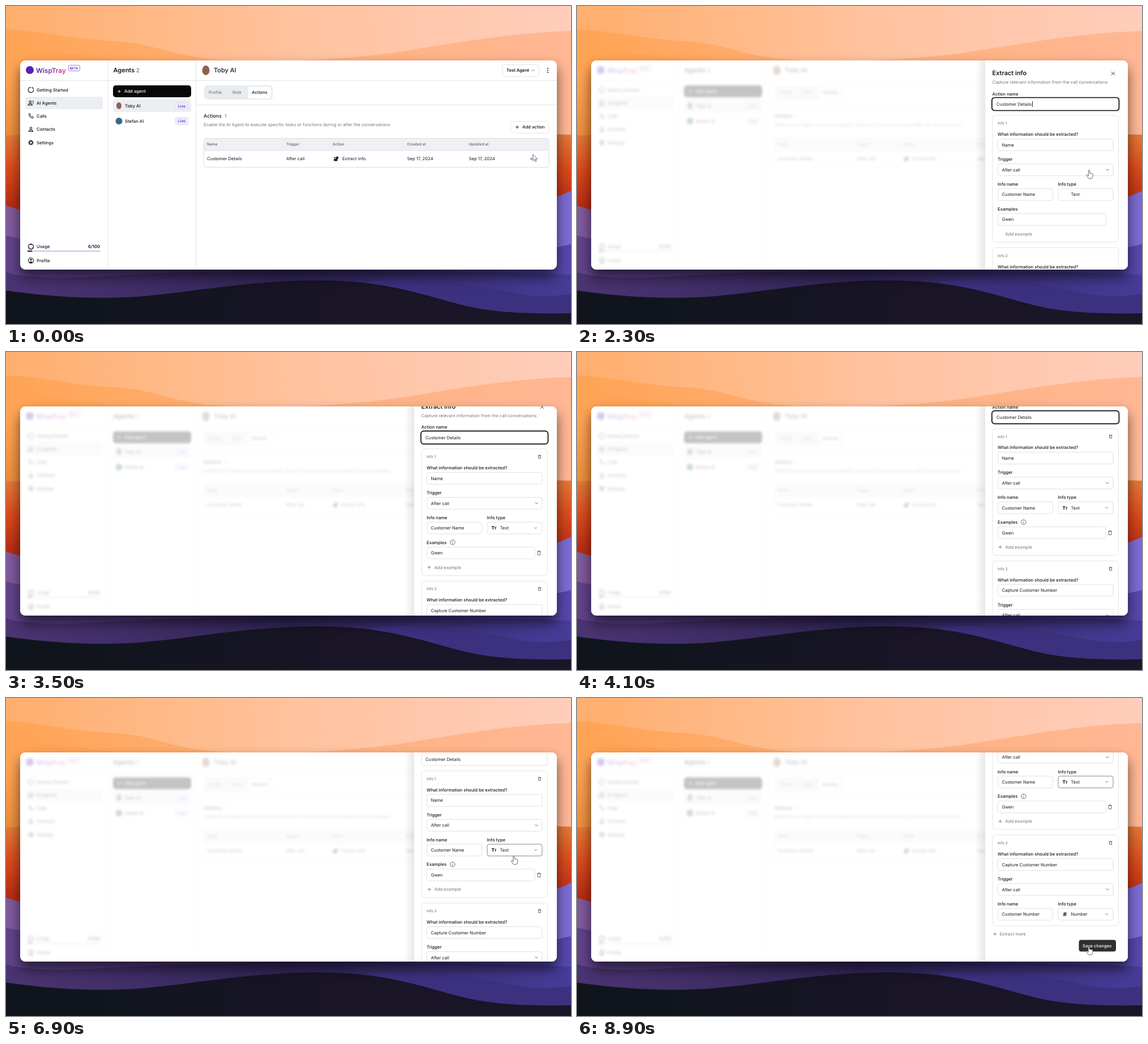
An HTML page that plays this animation: 998 by 561 pixels, repeating every 9 s.

```html
<!DOCTYPE html>
<html lang="en">
<head>
<meta charset="utf-8">
<title>Agent actions</title>
<style>
html, body { margin: 0; width: 100%; height: 100%; overflow: hidden; }
svg { display: block; width: 998px; height: 561px; }
text { font-family: Inter, sans-serif; text-rendering: geometricPrecision; white-space: pre; }
</style>
</head>
<body>
<svg id="stage" viewBox="0 0 998 561"></svg>
<script>
const INK = '#17181b', GRAY = '#74777d', LINE = '#e3e5e9', SOFT = '#eceff2';
const BASE = 7.68, SMALL = 6.58, LARGE = 10.97;

// Drawing helpers; text is placed by its vertical centre.
const text = (x, cy, s, size = BASE, weight = 400, fill = INK) =>
  `<text x="${x}" y="${cy + size * 0.36}" font-size="${size}" font-weight="${weight}" fill="${fill}">${s}</text>`;
const box = (x, y, w, h, r = 0, fill = '#fff', stroke = 'none', extra = '') =>
  `<rect x="${x}" y="${y}" width="${w}" height="${h}" rx="${r}" fill="${fill}" stroke="${stroke}" ${extra}/>`;
const line = (d, stroke = INK, width = 1) =>
  `<path d="${d}" fill="none" stroke="${stroke}" stroke-width="${width}" stroke-linecap="round" stroke-linejoin="round"/>`;
const fill = (d, color) => `<path d="${d}" fill="${color}"/>`;
const dot = (x, y, r, color = INK) => `<circle cx="${x}" cy="${y}" r="${r}" fill="${color}"/>`;
const ring = (x, y, r, stroke = INK, width = 1.1, extra = '') =>
  `<circle cx="${x}" cy="${y}" r="${r}" fill="none" stroke="${stroke}" stroke-width="${width}" ${extra}/>`;
const group = (attrs, ...parts) => `<g ${attrs}>${parts.join('')}</g>`;
const late = (...parts) => group('class="late"', ...parts);
const plus = (x, y, c = INK) => line(`M${x - 2.4} ${y}h4.8M${x} ${y - 2.4}v4.8`, c, 0.9);
const chevron = (x, y, s = 2.2) => line(`M${x - s} ${y - s / 2}l${s} ${s}l${s} ${-s}`, '#555', 0.9);
const trash = (x, y, s = 1) => line(
  `M${x - 3 * s} ${y - 2.5 * s}h${6 * s}M${x - s} ${y - 3.6 * s}h${2 * s}` +
  `M${x - 2.3 * s} ${y - 2.5 * s}v${6 * s}h${4.6 * s}v${-6 * s}`, '#555', 0.9);
const person = (x, y) => ring(x, y - 2, 1.8) + line(`M${x - 3.6} ${y + 4}q0 -2.6 3.6 -2.6t3.6 2.6z`, INK, 1.1);
const gradient = (id, coords, ...stops) =>
  `<linearGradient id="${id}" gradientUnits="userSpaceOnUse" ${['x1', 'y1', 'x2', 'y2'].map((k, i) => `${k}="${coords[i]}"`).join(' ')}>` +
  stops.map((c, i) => `<stop offset="${i / (stops.length - 1)}" stop-color="${c}"/>`).join('') + '</linearGradient>';

const defs = `<defs>
  <clipPath id="window">${box(25, 96, 948, 369, 9)}</clipPath>
  ${gradient('sky', [0, 60, 998, 0], '#ffae6c', '#ffc29d', '#ffcdbb')}
  ${gradient('amber', [0, 90, 998, 90], '#ffa455', '#ffb07a', '#ffb795')}
  ${gradient('side', [0, 120, 0, 235], '#ffa455', '#e98c3a')}
  ${gradient('red', [0, 226, 0, 350], '#e27a38', '#da4a1c', '#b72c14')}
  ${gradient('violet', [0, 0, 998, 0], '#805a9c', '#5d4694', '#7c6cd4')}
  ${gradient('plum', [0, 0, 998, 0], '#62438c', '#41306e', '#5648ac')}
  ${gradient('dusk', [0, 0, 998, 0], '#4b3472', '#33265a', '#463c98')}
  ${gradient('night', [150, 500, 600, 540], '#10151d', '#1a1527')}
  ${gradient('brand', [53, 0, 108, 0], '#5521b5', '#8b2aa8', '#d83a8b')}
  ${gradient('edge', [704, 0, 721, 0], '#0000', '#0000000c', '#00000018')}
</defs>`;

const wallpaper = [
  box(0, 0, 998, 561, 0, 'url(#sky)'),
  fill('M0 41C70 44 110 58 190 62S290 92 400 96S620 92 700 80S880 48 998 44V240H0Z', 'url(#amber)'),
  fill('M0 66C50 72 100 86 200 96V240H0Z', 'url(#side)'),
  fill('M0 228Q500 212 998 227V561H0Z', 'url(#red)'),
  fill('M0 352C200 420 800 420 998 326V561H0Z', 'url(#violet)'),
  fill('M0 405C200 450 800 470 998 420V561H0Z', 'url(#plum)'),
  fill('M0 470C60 486 140 478 260 472S700 462 998 474V561H0Z', 'url(#dusk)'),
  fill('M640 486C720 478 820 490 880 503S960 512 998 508V561H760Z', '#3c317f'),
  fill('M0 502C70 512 150 518 230 513C330 505 430 484 550 484C640 484 700 498 760 515S860 545 998 542V561H0Z', 'url(#night)'),
  box(25, 108, 948, 370, 9, '#000', 'none', 'opacity=".58" style="filter:blur(11px)"')
].join('');

const liveBadge = y => box(299, y - 6.5, 23, 13, 3, '#ede9fe', '#ddd6fe', 'stroke-width=".7"') + text(304, y, 'Live', SMALL, 500, '#5b21b6');

const navItems = [['Getting Started', 148], ['AI Agents', 171], ['Calls', 194], ['Contacts', 217.5], ['Settings', 241]];
const sidebar = [
  dot(42, 113, 7, '#5b21b6'),
  text(53, 113.5, 'WispTray', 11.7, 600, 'url(#brand)'),
  box(110.5, 104.5, 20, 10, 2, '#fff', '#8b5cc9', 'stroke-width=".8"'),
  text(112.7, 109.6, 'BETA', 5.6, 600, '#5b21b6'),
  box(34, 160, 137, 22, 4, SOFT),
  ...navItems.map(([label, y]) => text(54, y, label, BASE, 500)),
  line('M43 143.3a4.7 4.7 0 1 0 5.7 5M45.5 143.4a4.7 4.7 0 0 1 3 3', INK, 1.2),
  person(42.8, 171), line('M47 168.2h1.5M47 171h1.5', INK, 1.2),
  line('M40.5 190.5q0 7 7 7.5l.8 -2.2l-2.3 -1.2l-1.2 1q-1.8 -1 -2.4 -2.6l1 -1l-1 -2.2z'),
  person(44, 217.5),
  ring(44, 241, 3.6, INK, 1.8, 'stroke-dasharray="1.9 .9"'), ring(44, 241, 2.4),
  ring(44, 424.5, 4.5, INK, 1.3), line('M44 420v2.2M40 427.5l1.8 -1.2M48 427.5l-1.8 -1.2'),
  text(54, 424.5, 'Usage', BASE, 500), text(145, 424.5, '6/100', BASE, 600),
  box(38, 431.5, 129, 2, 1, '#c9bfe6'), box(38, 431.5, 8, 2, 0, '#111'),
  ring(44, 449, 4.6), dot(44, 447.6, 1.6), fill('M41 452q3 -3 6 0q-3 2.4 -6 0z', INK),
  text(54, 449, 'Profile', BASE, 500)
].join('');

const agents = [
  text(189.5, 113.5, 'Agents', LARGE, 600), text(230, 114, '2', 9.5, 400, '#555'),
  box(189, 140, 138, 21, 5, '#080808'), plus(200, 150.7, '#fff'), text(209, 150.7, 'Add agent', BASE, 500, '#fff'),
  box(189, 165, 138, 22, 4, SOFT),
  `<ellipse cx="199.5" cy="176" rx="4.5" ry="6" fill="#8d6450"/>`,
  text(210, 176.2, 'Toby AI', BASE, 500), liveBadge(176.3),
  dot(199.5, 203, 6, '#35698a'),
  text(210, 203, 'Stefan AI', BASE, 500), liveBadge(203)
].join('');

// Table columns slide a little when the layout narrows.
const columns = [
  [355, 'Name', 'Customer Details'], [495, 'Trigger', 'After call'], [577, 'Action', 'Extract info', 17],
  [708.5, 'Created at', 'Sep 17, 2024'], [817.5, 'Updated at', 'Sep 17, 2024']
];
const sliding = (x, ...parts) => group(`class="slide" data-amount="${(3.2 * (x - 349)) / 610}"`, ...parts);
const content = [
  `<ellipse cx="353" cy="113.5" rx="6.5" ry="8.5" fill="#8d6450"/>`,
  text(367, 113.5, 'Toby AI', LARGE, 500),
  sliding(959,
    box(876.5, 103.5, 65, 21, 4, '#fff', LINE), text(884, 113.7, 'Test Agent', BASE, 600), chevron(931, 113.7),
    box(891.5, 203.5, 67.5, 20.5, 4, '#fff', LINE), plus(903, 213.7), text(912, 213.7, 'Add action', BASE, 500)),
  ...[110, 113.5, 117].map(y => dot(957, y, 1)),
  box(350, 140, 121, 25, 5, '#e8ebef'), box(427.5, 142.5, 41, 20.5, 4),
  text(358, 152.7, 'Profile', BASE, 400, '#6d7077'), text(400, 152.7, 'Role', BASE, 400, '#6d7077'), text(434, 152.7, 'Actions', BASE, 500),
  text(349, 194.3, 'Actions', 8.78, 500), text(386, 194.3, '1', 8, 400, '#666'),
  text(349, 209, 'Enable the AI Agent to execute specific tasks or functions during or after the conversations', BASE, 400, GRAY),
  box(349.5, 233.5, 609.5, 51, 4, '#fff', '#d9dce1'),
  fill('M350 255V238q0 -4 4 -4H954.5q4 0 4 4V255Z', '#eff0f3'), line('M350 255H958.5', '#d9dce1', 0.8),
  ...columns.map(([x, head, cell, indent = 0]) =>
    sliding(x, text(x, 244, head, SMALL, 600, '#6b7078'), text(x + indent, 269.7, cell))),
  sliding(583, box(579, 267, 5.5, 1.2, 0, INK), box(579, 269.5, 6.5, 4, 1, INK), dot(585, 267.7, 2.3)),
  sliding(959, ...[927.7, 931, 934.3].map(x => dot(x, 269.7, 1.1)))
].join('');

const dividers = line('M180.5 96V465M335.5 96V465M25 131.5H973M336 174.5H973', LINE);

const field = (x, cy, w, label, indent = 7, id = '') =>
  box(x, cy - 10.4, w, 20.8, 3.5, '#fff', '#dfe1e5', id) + text(x + indent, cy, label);

// Form card, with rows measured from its top edge.
const card = (top, number, info, name, type, height, typeIcon, id, extra = '') => [
  box(734, top, 222.5, height, 5, '#fff', LINE),
  text(743, top + 14, `Info ${number}`, SMALL, 400, '#666'), late(trash(942.5, top + 14, 0.8)),
  text(743, top + 33.5, 'What information should be extracted?', BASE, 500),
  field(743.5, top + 52, 203.5, info),
  text(743, top + 77.5, 'Trigger', BASE, 500),
  field(743.5, top + 96, 203.5, 'After call'), chevron(937, top + 96),
  text(743, top + 121.4, 'Info name', BASE, 500), text(849.5, top + 121.4, 'Info type', BASE, 500),
  field(743.5, top + 139.7, 97, name),
  field(850, top + 139.7, 97, type, 22.5, id), late(typeIcon, chevron(935.5, top + 139.7, 1.8)), extra
].join('');

const examples = [
  text(743, 358, 'Examples', BASE, 500),
  late(ring(788.8, 358, 4.2, '#555', 0.9), line('M788.8 358v2M788.8 356v.1', '#555', 0.9), trash(941.5, 376.7)),
  field(743.5, 376.7, 190.5, 'Gwen'),
  late(plus(747.5, 402, GRAY)), text(756.5, 402, 'Add example', BASE, 400, GRAY)
].join('');

const panel = group('id="panel"',
  box(704, 96, 17, 369, 0, 'url(#edge)'), box(721, 96, 252, 369),
  group('id="form"',
    text(733.5, 118, 'Extract info', LARGE, 600), line('M944 116.2l5.8 5.8M949.8 116.2l-5.8 5.8', '#333', 0.9),
    text(733.5, 134.2, 'Capture relevant information from the call conversations', BASE, 400, GRAY),
    text(733.5, 154.8, 'Action name', BASE, 500),
    field(734, 173, 222.5, 'Customer Details'),
    box(732.8, 161.5, 224.7, 23, 5, 'none', '#111', 'id="focus" stroke-width="1.7"'),
    box(804, 168, 0.9, 10, 0, '#111', 'none', 'id="caret"'),
    card(193, 1, 'Name', 'Customer Name', 'Text', 223.5,
      text(857.5, 332.6, 'T', 8, 800) + text(862.5, 333.3, 'T', 6, 800), 'id="select"', examples),
    card(426.3, 2, 'Capture Customer Number', 'Customer Number', 'Number', 160, text(858.5, 566, '#', 10, 700), ''),
    late(plus(738.3, 601, GRAY)), text(746.5, 601, 'Extract more', BASE, 400, GRAY),
    box(886.5, 611.3, 65.5, 20.5, 4, '#0b0b0c', 'none', 'id="save"'), text(893, 621.5, 'Save changes', BASE, 500, '#fff')));

const cursorShape = 'fill="#fff" stroke="#555" stroke-width=".9" stroke-linejoin="round"';
const cursors =
  `<path id="arrow" ${cursorShape} d="M0 0V11L2.6 8.7L4.4 12.7L6.2 11.9L4.5 8H8Z"/>` +
  `<path id="hand" ${cursorShape} d="M-2.4 -6.6a1.1 1.1 0 0 1 2.2 0V-2.2L4 -1.4Q6 -1 5.7 1.6L4.8 5Q4.4 7.7 2 7.7H-.8Q-2.5 7.5 -4 4.6L-5.8 1.4Q-5 0 -3.8 1.1L-2.4 2.4Z"/>`;

const stage = document.getElementById('stage');
stage.innerHTML = defs + wallpaper + group('clip-path="url(#window)"',
  box(25, 96, 948, 369),
  group('id="page"', dividers, sidebar, agents, content),
  box(25, 96, 948, 369, 0, '#fff', 'none', 'id="veil"'),
  panel) + cursors;

const el = id => document.getElementById(id);
const ramp = (t, from, to) => Math.min(1, Math.max(0, (t - from) / (to - from)));
const ease = (t, from, to) => { const u = ramp(t, from, to); return u * u * (3 - 2 * u); };
const mix = (a, b, u) => a + (b - a) * u;
const show = (node, on) => node.setAttribute('visibility', on ? 'visible' : 'hidden');
const move = (node, x, y) => node.setAttribute('transform', `translate(${x} ${y})`);

function handPosition(t) {
  if (t < 3100) {
    const u = ease(t, 1000, 1400);
    return [mix(928, 905.8, u), mix(276, 297, u)];
  }
  if (t < 8000) return [898.3, 286];
  return [905.5, mix(452, 445.5, ease(t, 8500, 8800))];
}

function render(t) {
  el('page').style.filter = t > 1900 ? `blur(${2 * ramp(t, 1900, 2200)}px)` : 'none';
  el('veil').setAttribute('opacity', 0.76 * ease(t, 1750, 1980));
  document.querySelectorAll('.slide').forEach(g => move(g, t >= 500 ? -g.dataset.amount : 0, 0));
  document.querySelectorAll('.late').forEach(g => show(g, t >= 2400));

  move(el('panel'), mix(270, 0, ease(t, 1780, 2270)), 0);
  const scroll = 59 * ease(t, 3000, 4200) + 125.5 * ease(t, 6840, 7320);
  move(el('form'), 0, -scroll);
  show(el('focus'), t < 5200);
  show(el('caret'), (t >= 2000 && t < 3100) || (t >= 4500 && t < 4900));
  el('select').setAttribute('stroke', t >= 5200 ? '#85888e' : '#dfe1e5');
  const hover = ramp(t, 8400, 8700);
  el('save').setAttribute('fill', `rgb(${mix(11, 47, hover)},${mix(11, 47, hover)},${mix(12, 51, hover)})`);

  show(el('arrow'), t < 300);
  move(el('arrow'), mix(930.7, 929, ramp(t, 0, 300)), mix(262, 266, ramp(t, 0, 300)));
  show(el('hand'), (t >= 300 && t < 3100) || (t >= 5200 && t < 8000) || t >= 8500);
  move(el('hand'), ...handPosition(t));
}

const start = performance.now();
function tick() {
  const t = (performance.now() - start) % 9000;
  render(Math.floor(t / 100) * 100);
  requestAnimationFrame(tick);
}
tick();
</script>
</body>
</html>
```
